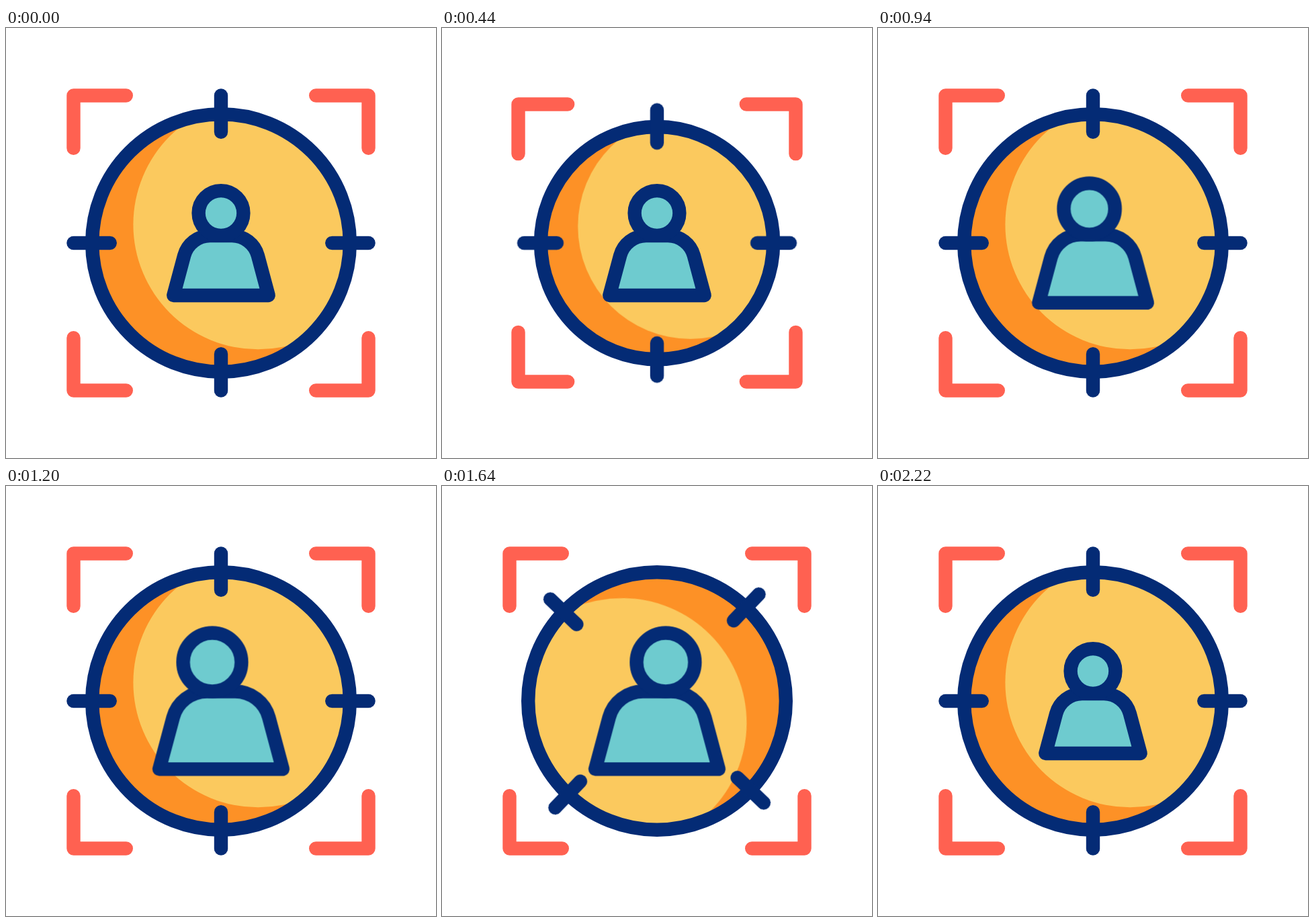
An HTML page that plays this animation: 640x640 px, repeating every 2400 ms.

```html
<!DOCTYPE html>
<html lang="en">
<head>
<meta charset="utf-8">
<title>Target audience</title>
<style>
  /* Scale is a registered number so strokes can be divided by it and keep their weight. */
  @property --s { syntax: "<number>"; inherits: true; initial-value: 1; }

  :root {
    --navy: #042b75;
    --coral: #ff6151;
    --yellow: #fbc95e;
    --orange: #fd9126;
    --teal: #6ecbcf;
    --weight: 20.4px;
  }
  html, body { margin: 0; width: 100%; height: 100%; overflow: hidden; background: #fff; }
  svg { display: block; width: 100%; height: 100%; }

  .scale {
    transform: scale(var(--s));
    stroke-width: calc(var(--weight) / var(--s));
    stroke-linecap: round;
    stroke-linejoin: round;
  }
  .scale, .disc, .ticks, .head {
    animation: 2400ms cubic-bezier(.3333, 0, .6667, 1) infinite;
  }
  .corners { animation-name: corners; fill: none; stroke: var(--coral); }
  .scope { animation-name: scope; stroke: var(--navy); }
  .disc { animation-name: turn; }
  .ticks { animation-name: quarter; }
  .person { animation-name: person; fill: var(--teal); stroke: var(--navy); }
  .head { animation-name: look; }

  @keyframes corners {
    0%, 8.3333%, 37.5%, 100% { --s: 1; }
    25% { --s: .909; }
  }
  @keyframes scope {
    0%, 8.3333%, 37.5%, 100% { --s: 1; }
    25% { --s: .85; }
  }
  @keyframes turn {
    0%, 50% { transform: rotate(0deg); }
    87.5%, 100% { transform: rotate(360deg); }
  }
  @keyframes quarter {
    0%, 50% { transform: rotate(0deg); }
    87.5%, 100% { transform: rotate(90deg); }
  }
  @keyframes person {
    0%, 29.1667%, 91.6667%, 100% { --s: 1; }
    50%, 75% { --s: 1.3; }
  }
  @keyframes look {
    0%, 29.1667%, 91.6667%, 100% { transform: translateX(0); }
    50% { transform: translateX(-10px); }
    68.75%, 75% { transform: translateX(10px); }
  }
</style>
</head>
<body>
<svg viewBox="0 0 640 640">
  <defs>
    <clipPath id="rim"><circle r="191.8"/></clipPath>
    <path id="corner" d="M-141.2-219.5H-219.5V-141.2"/>
    <path id="tick" d="M0-219.5V-165.2"/>
  </defs>
  <g transform="translate(320 320)">
    <g class="scale corners">
      <use href="#corner"/>
      <use href="#corner" transform="rotate(90)"/>
      <use href="#corner" transform="rotate(180)"/>
      <use href="#corner" transform="rotate(270)"/>
    </g>
    <g class="scale scope">
      <g class="disc">
        <g clip-path="url(#rim)" stroke="none">
          <circle r="191.8" fill="var(--orange)"/>
          <circle cx="55.2" cy="-27.5" r="185.8" fill="var(--yellow)"/>
        </g>
      </g>
      <circle r="191.8" fill="none"/>
      <g class="ticks">
        <use href="#tick"/>
        <use href="#tick" transform="rotate(90)"/>
        <use href="#tick" transform="rotate(180)"/>
        <use href="#tick" transform="rotate(270)"/>
      </g>
    </g>
    <g class="scale person">
      <path d="M-70.7 78L-54.8 18.7A40 40 0 0 1-16.2-10.9H16.2A40 40 0 0 1 54.8 18.7L70.7 78Z"/>
      <circle class="head" cy="-44.5" r="33.4"/>
    </g>
  </g>
</svg>
</body>
</html>
```
